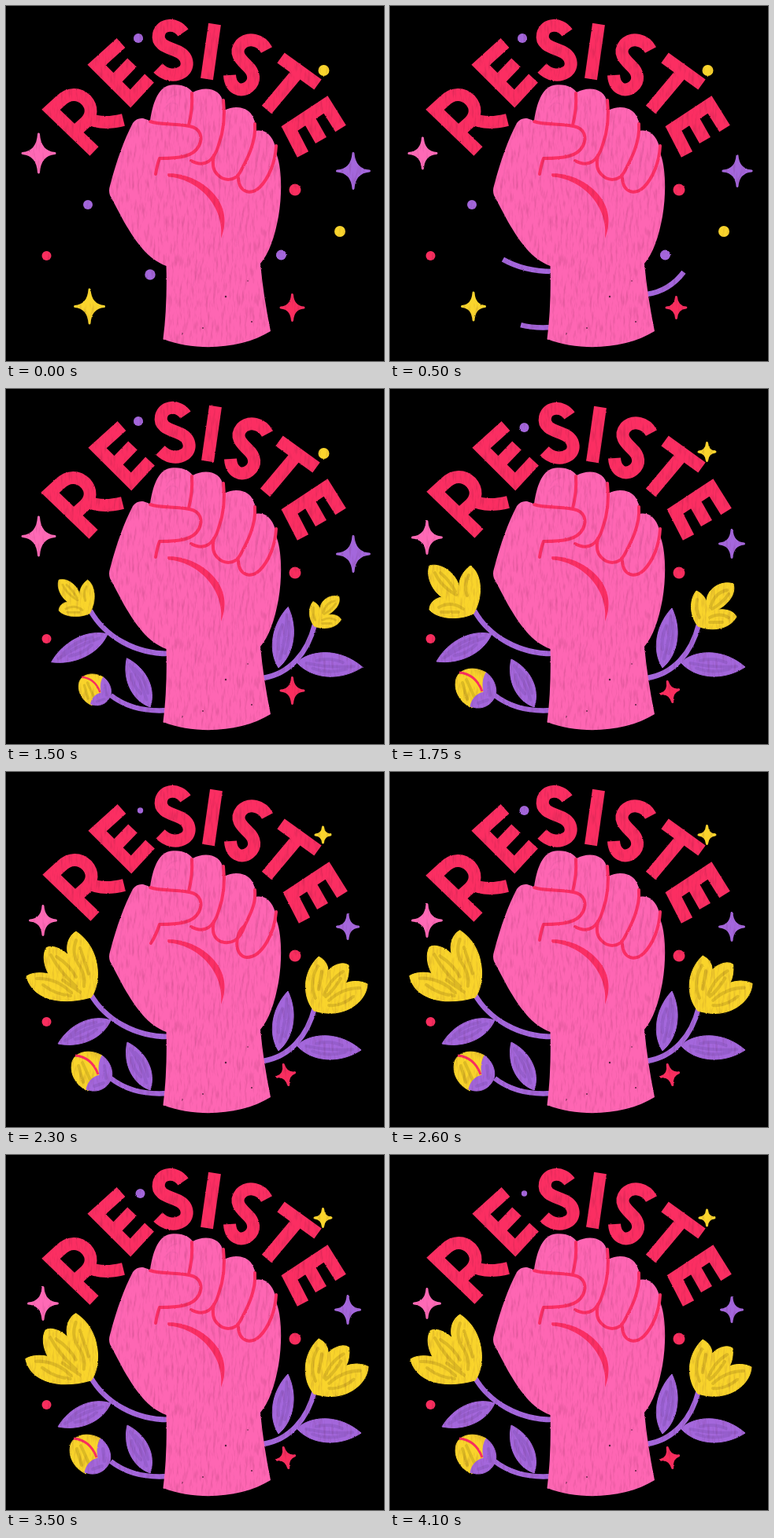
These frames come from a looping animation (480x452 px, 4.4 s). An HTML page:

```html
<!DOCTYPE html>
<html lang="es">
<head>
<meta charset="utf-8">
<title>Resiste</title>
<style>
  html, body { margin: 0; width: 100%; height: 100%; overflow: hidden; background: #000; }
  svg { display: block; width: 100%; height: 100%; }
  path { stroke-linejoin: round; }
  #lettering { fill: none; stroke: #fb2e62; stroke-width: 16; }
  #lettering path { stroke-linejoin: miter; }
  #creases path { fill: none; stroke: #fa2e64; stroke-width: 4; stroke-linecap: round; }
  .vine { fill: none; stroke: #a467dc; stroke-width: 6.6; }
  .leaf { fill: #a467dc; stroke: #a467dc; stroke-width: 1; }
  .petal { fill: #f9d42b; stroke: #f9d42b; stroke-width: 1; }
  .shade { fill: none; stroke-linecap: round; }
  .leaf-shade { stroke: #6d459c; stroke-width: 4; opacity: .25; }
  .petal-shade { stroke: #927513; stroke-width: 4; opacity: .28; }
</style>
</head>
<body>
<svg viewBox="0 0 480 452" role="img" aria-label="RESISTE">
  <defs>
    <filter id="crayon" filterUnits="userSpaceOnUse" x="0" y="0" width="480" height="452" color-interpolation-filters="sRGB">
      <feTurbulence type="fractalNoise" baseFrequency=".55" numOctaves="2" seed="4"/>
      <feColorMatrix values="1 0 0 0 0  0 1 0 0 0  0 0 1 0 0  0 0 0 0 1" result="noise"/>
      <feDisplacementMap in="SourceGraphic" in2="noise" scale="1.8" xChannelSelector="R" yChannelSelector="G" result="rough"/>
      <feTurbulence type="fractalNoise" baseFrequency=".3 .06" numOctaves="3" seed="9"/>
      <feColorMatrix values="0 0 0 0 .3  0 0 0 0 .05  0 0 0 0 .15  .4 0 0 0 -.19" result="streaks"/>
      <feComposite in="streaks" in2="rough" operator="atop"/>
    </filter>
  </defs>
  <rect width="480" height="452"/>
  <g filter="url(#crayon)">
    <g id="plants"></g>
    <path fill="#fe66b3" d="M199.500 424 Q205 380 203.500 331 C180 322 166 302 150 275 L132 241 Q130 235 132 229 C140 198 150 170 161 149
      Q166 142 174 143 L183 146 C187 119 195 102 210 100.500 C224 99 233 104 237 110 C252 102 273 104 276 124 L277 133
      C292 125 313 128 316 149 L317 159 C333 156 342 170 344 190 C350 207 351 238 346 268 C341 295 334 315 323 328
      Q327 370 336 414 C301 436 243 441 199.500 424Z"/>
    <g fill="none" stroke="#cf579b" stroke-width="2" stroke-linecap="round" opacity=".18">
      <path d="M204 123 Q207 114 217 113 M202 130 Q210 119 218 126 L217 141 M210 139 Q207 129 212 121"/>
      <path d="M250 125 L252 174 M284 146 L281 190 M322 173 L318 204 M150 180 L142 231 M246 326 L237 357 M300 265 L292 306"/>
    </g>
    <g fill="#55233e">
      <circle cx="279" cy="370" r="1.2"/><circle cx="307" cy="350" r=".8"/><circle cx="250" cy="410" r=".9"/>
      <circle cx="312" cy="402" r="1"/><circle cx="224" cy="417" r=".8"/>
    </g>
    <g id="creases"></g>
    <path fill="#fa2e64" d="M205 213.500 C240 211 294 246 273 296 C278 256 245 220 206 217.500Z"/>
    <g id="lettering"></g>
    <g id="sparks"></g>
  </g>
</svg>
<script>
const PINK = '#fe6ab6', RED = '#fa2e5f', PURPLE = '#a467dc', YELLOW = '#fad52d';
const LOOP = 4400;
const POSES = 'cbcabcababcabcab';
const layer = id => document.getElementById(id);
const path = (d, attrs = '') => `<path d="${d}" ${attrs}/>`;

// Each letter: outline, then its offsets in poses a and c.
const LETTERS = [
  ['M113 184 L58 131 L70 120 C81 109 94 110 103 119 C111 128 110 139 102 147 L91 157 M104 141 C117 149 134 148 150 144', [-2, 1], [-1, 1]],
  ['M147 47 L116 75 L159 118 L183 92 M137 97 L161 72', [0, 0], [-1, 0]],
  ['M228 34 C219 21 200 22 197 36 C194 50 210 53 219 57 C235 63 236 78 227 84 C216 91 204 87 196 79', [0, -1], [-3, 0]],
  ['M267 23 L257 93', [-1, -1], [-2, 0]],
  ['M332 56 C325 43 309 39 299 49 C290 60 300 69 307 76 C317 85 318 96 309 103 C299 111 286 105 285 88', [0, 1], [-1, 0]],
  ['M349 66 L396 100 M372 83 L331 132', [-2, 0], [0, 0]],
  ['M427 156 L408 125.5 L362 156 L379 189 M385 141 L402 171', [-2, 0], [-2, 0]]
];

function drawLettering(pose) {
  layer('lettering').innerHTML = LETTERS.map(([d, a, c]) => {
    const [x, y] = { a, b: [0, 0], c }[pose];
    return path(d, `transform="translate(${x} ${y})"`);
  }).join('');
}

function drawCreases(long) {
  const fingers = long
    ? ['M316 150 C318 170 308 184 303 196 C297 215 285 220 273 216 C264 212 261 203 264 190',
       'M343 178 C341 205 325 236 306 236 C289 235 290 205 303 196']
    : ['M316 150 C318 175 304 199 297 212 C290 224 276 223 268 214 C262 208 262 199 264 190',
       'M343 178 C342 200 333 220 322 231 C311 241 296 238 295 219'];
  layer('creases').innerHTML = [
    'M183 147 C197 152 216 149 233 153 C248 156 250 168 245 178 C238 192 220 194 195 194 '
      + (long ? 'Q190 209 184 218' : 'Q192 202 190 214'),
    'M236 111 C237 126 235 140 232 152',
    'M276 120 C279 145 275 163 270 177 C264 198 252 206 235 197',
    ...fingers
  ].map(d => path(d)).join('');
}

function star(x, y, rx, ry, color, turn = 0) {
  const a = rx - 1.5, b = ry - 1.5, p = a * .07, q = b * .07;
  const d = `M0 ${-b}Q${p} ${-q} ${a} 0Q${p} ${q} 0 ${b}Q${-p} ${q} ${-a} 0Q${-p} ${-q} 0 ${-b}Z`;
  return path(d, `transform="translate(${x} ${y}) rotate(${turn})" fill="${color}" stroke="${color}" stroke-width="3"`);
}
const dot = (x, y, r, color) => `<circle cx="${x}" cy="${y}" r="${r}" fill="${color}"/>`;

function drawSparks(i, pose) {
  const small = pose === 'b' && i > 8;
  const parts = [dot(51.5, 318, 6, RED), dot(367, 234, 7.5, RED)];
  if (i < 7) {
    const grow = [0, -3, -3, 0, 3, 3, 0][i];
    parts.push(
      star(41.5, 187.5, 22 + grow, 26 + grow * 1.7, PINK),
      star(441, 210, 22 + grow * .8, 24 + grow, PURPLE),
      star(363.5, 384, 16 + grow * .7, 18 + grow, RED),
      dot(168, 41, 6, PURPLE), dot(403.5, 82, 7, YELLOW));
  } else {
    const s = small ? 2 : 0;
    parts.push(
      star(47, 189, 20 - s, 22 - s, PINK),
      star(434, 197, 17 - s, 19 - s, PURPLE),
      star(355.5, 385.5, 13, 15, RED, -14),
      dot(170.5, 49, small ? 3.7 : 6, PURPLE),
      star(402.5, 80, small ? 11 : 12, small ? 11.5 : 13, YELLOW));
  }
  if (i < 6) parts.push(dot(104, 253, 6, i < 3 ? PURPLE : YELLOW));
  if (i < 3) parts.push(dot(424, 287, 7, YELLOW), star(106, 382.5, 20 - i * 2, 23 - i * 2, YELLOW));
  else if (i < 5) parts.push(star(424, 292, 11, 12, YELLOW), star(105, 375, 12, 12, YELLOW, 35));
  if (i < 2) parts.push(dot(183, 342, 6.7, PURPLE));
  if (i < 3) parts.push(dot(349.5, 317, 6.5, PURPLE));
  layer('sparks').innerHTML = parts.join('');
}

function leaf(x, y, tipX, tipY, width, growth) {
  const dx = (tipX - x) * growth, dy = (tipY - y) * growth;
  const len = Math.hypot(dx, dy), w = width * Math.sqrt(growth);
  const at = (along, side) => `${x + dx * along - dy / len * side * w} ${y + dy * along + dx / len * side * w}`;
  const body = `M${at(0, 0)}C${at(.25, 1)} ${at(.68, 1)} ${at(1, 0)}C${at(.68, -1)} ${at(.25, -1)} ${at(0, 0)}Z`;
  const shade = `M${at(.15, 0)}Q${at(.5, .22)} ${at(.87, 0)}M${at(.25, .3)}Q${at(.5, .6)} ${at(.76, .2)}M${at(.3, -.2)}Q${at(.5, -.5)} ${at(.7, -.2)}`;
  return path(body, 'class="leaf"') + path(shade, 'class="shade leaf-shade"');
}

const FLOWERS = [
  { x: 107, y: 285,
    half: 'M106 286 C118 267 118 236 102 225 C93 232 87 242 88 252 C83 232 63 221 50 225 C45 240 55 258 66 265 C58 266 50 272 50 281 C60 293 88 295 106 286Z',
    halfShade: 'M57 234 Q64 251 84 262 M64 234 Q76 244 83 258 M100 237 Q93 251 98 263 M62 278 Q78 269 93 280 M65 284 L87 284',
    open: 'M108 287 C121 271 122 225 89 203 C80 208 75 221 79 233 C69 223 56 220 51 224 C46 233 48 246 54 257 C45 255 33 255 26 260 C32 287 65 299 108 287Z',
    openShade: 'M89 214 Q83 230 91 243 Q101 257 99 273 M94 224 L105 257 M57 233 Q67 253 89 273 M64 235 Q80 245 89 261 M39 263 Q64 262 83 281 M47 271 Q62 283 82 285 M72 265 L94 280' },
  { x: 392, y: 302,
    half: 'M391 302 C380 288 380 268 389 257 C396 260 401 266 402 272 C401 255 420 243 436 248 C440 262 428 275 416 281 C426 280 436 282 440 290 C432 305 410 310 391 302Z',
    halfShade: 'M390 268 Q388 281 393 291 M428 256 Q411 260 407 278 M430 261 Q422 273 409 280 M406 291 Q419 284 430 291 M406 297 L422 297',
    open: 'M391 304 C376 286 376 255 397 235 C405 239 409 246 409 253 C416 245 428 241 435 246 C436 256 434 264 431 269 C440 265 452 266 459 270 C458 292 430 316 391 304Z',
    openShade: 'M396 247 Q384 267 393 288 M401 254 L397 277 M428 254 Q411 264 404 284 M425 263 Q416 278 406 286 M449 275 Q427 275 410 291 M441 286 Q425 299 410 297' }
];

function flower(f, i, pose) {
  const opened = i > 7;
  const size = opened ? { a: 1.03, b: 1, c: 1.015 }[pose] : [.4, .7, 1][i - 5];
  return `<g transform="translate(${f.x} ${f.y}) scale(${size}) translate(${-f.x} ${-f.y})">`
    + path(opened ? f.open : f.half, 'class="petal"')
    + path(opened ? f.openShade : f.halfShade, 'class="shade petal-shade"') + '</g>';
}

function bud(i, pose) {
  if (i < 5) {
    return path('M133 391 C139 378 132 362 124 360 C117 366 116 378 124 387 C114 386 106 395 105 404 C115 409 128 407 133 391Z', 'class="leaf"');
  }
  const size = i < 7 ? [.6, .8][i - 5] : 1;
  const shift = { a: -1, b: 0, c: -2 }[pose];
  return `<g transform="translate(${134 + shift} 390) scale(${size}) translate(-134 -390)">`
    + path('M122 361 C106 352 88 356 84 369 C80 385 90 400 104 406 L120 386Z', 'class="petal"')
    + path('M92 374 L98 395 M97 370 L107 392', 'class="shade petal-shade"')
    + path('M88 361 Q109 363 117 385', 'fill="none" stroke="#fa2e5f" stroke-width="3"')
    + path('M122 361 C131 367 137 380 134 390 C128 405 114 409 102 404 C104 394 110 388 119 386 C117 376 118 368 122 361Z', 'class="leaf"')
    + path('M125 374 L127 390 M112 400 L124 396', 'class="shade leaf-shade"') + '</g>';
}

function drawPlants(i, pose) {
  const stem = Math.min(1, i * .26);
  const vines = [
    i < 5 ? 'M206 338 C165 338 125 322 102 280' : 'M206 337 C165 337 126 316 107 282',
    'M206 409 C180 411 155 407 133 390',
    i < 5 ? 'M326 367 C360 362 384 335 393 291' : 'M326 368 C360 363 383 336 392 300'
  ];
  const parts = i ? vines.map(d => path(d, `class="vine" pathLength="1" stroke-dasharray="${stem} 2"`)) : [];
  if (i > 2) {
    const g = i === 3 ? .45 : i === 4 ? .82 : pose === 'a' ? 1.02 : 1;
    const left = i > 7 ? [133, 316, 66, 346] : [129, 312, 59, 347];
    parts.push(
      leaf(...left, 17, g),
      leaf(183, 405, 154, 344, 17, g),
      leaf(346, 355, 358, 279, 17, g),
      leaf(369, 348, 451, 354, 20, g));
  }
  if (i > 3) parts.push(bud(i, pose));
  if (i > 4) parts.push(...FLOWERS.map(f => flower(f, i, pose)));
  layer('plants').innerHTML = parts.join('');
}

let shown = -1;
const start = performance.now();

function render() {
  const t = (performance.now() - start) % LOOP;
  const i = t < 2000 ? Math.floor(t / 250) : 8 + Math.floor((t - 2000) / 300);
  if (i !== shown) {
    shown = i;
    const pose = POSES[i];
    drawPlants(i, pose);
    drawCreases(i === 4 || i === 9);
    drawLettering(pose);
    drawSparks(i, pose);
  }
  requestAnimationFrame(render);
}
render();
</script>
</body>
</html>
```
